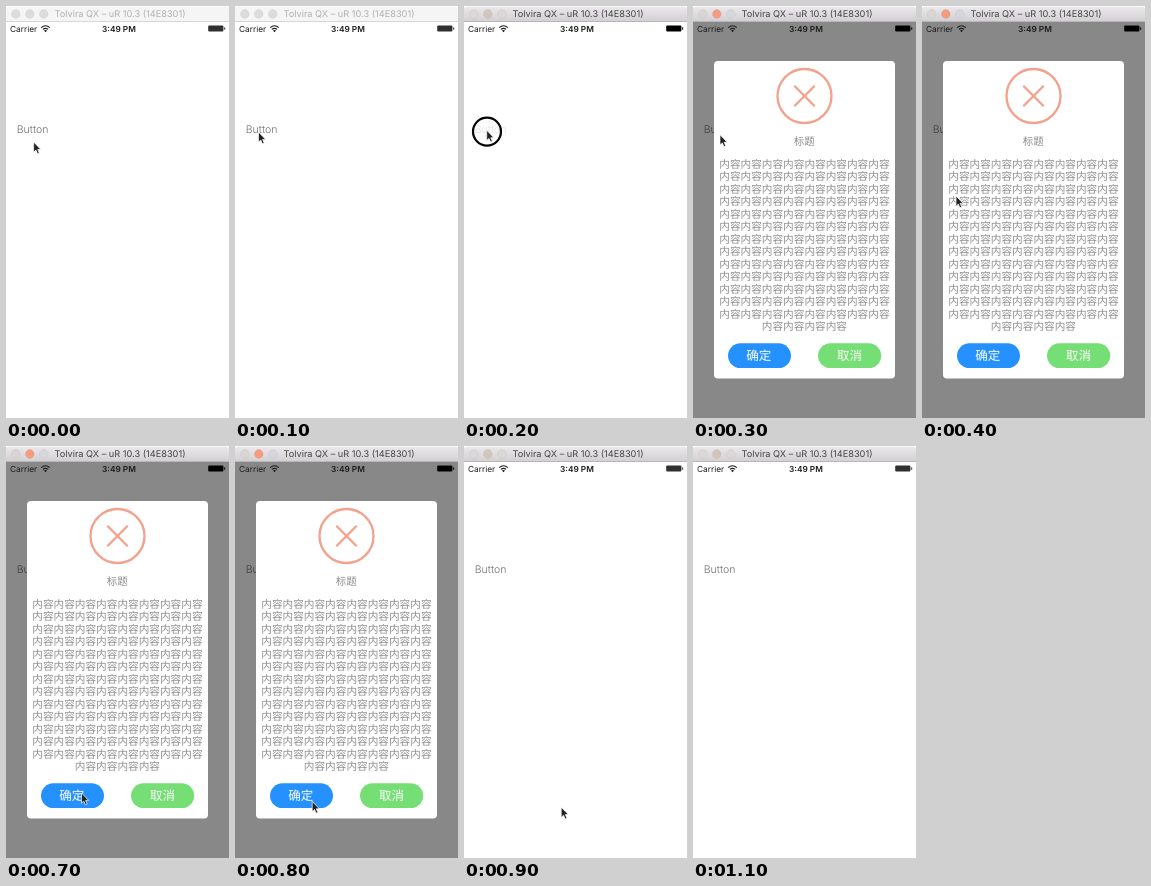
An HTML page for the animation above (1200 ms loop, 223 px wide and 412 px high).

```html
<!DOCTYPE html>
<html lang="zh">
<head>
<meta charset="utf-8">
<style>
  html, body { margin: 0; width: 100%; height: 100%; overflow: hidden; background: #fff; }
  svg { display: block; width: 223px; height: 412px; font-family: Inter, Roboto, sans-serif; text-rendering: geometricPrecision; }
  .cjk { font-family: "Noto Sans CJK SC", "Noto Sans CJK", "Noto Sans CJK JP", sans-serif; text-anchor: middle; }
  .mid { text-anchor: middle; }
</style>
</head>
<body>
<svg viewBox="0 0 223 412">
  <defs>
    <linearGradient id="bar" x2="0" y2="1">
      <stop stop-color="#ebe8eb"/><stop offset="1" stop-color="#d2d0d2"/>
    </linearGradient>
  </defs>
  <rect width="223" height="412" fill="#fff"/>

  <text id="button" x="10.8" y="126.6" font-size="10.5" font-weight="300" fill="#707070">Button</text>
  <rect id="dim" y="15" width="223" height="397" fill="#000" opacity=".465"/>

  <g id="status" fill="#1c1c1c">
    <text x="4" y="25.6" font-size="8.3">Carrier</text>
    <g fill="none" stroke="#1c1c1c" stroke-width="1.2">
      <path d="M35.2 21.6Q39.5 17.9 43.8 21.6M36.9 23.4Q39.5 21.2 42.1 23.4"/>
    </g>
    <path d="M37.9 24.5Q39.5 23.3 41.1 24.5L39.5 26.2Z"/>
    <text class="mid" x="112.9" y="25.6" font-size="8.3" font-weight="600">3:49 PM</text>
    <g id="battery">
      <rect x="202.2" y="19.6" width="15.2" height="5.8" rx="1"/>
      <rect x="218.2" y="21.3" width="1" height="2.4" rx=".5"/>
    </g>
  </g>

  <g id="titlebar">
    <path id="chrome" d="M0 15.5V3Q0 .8 3 .8H220Q223 .8 223 3V15.5Z"/>
    <path id="edge" d="M0 15.5H223" stroke-width="1"/>
    <g id="dots" stroke="#000" stroke-opacity=".08" stroke-width=".6">
      <circle cx="9.8" cy="8" r="4.4"/>
      <circle cx="23.8" cy="8" r="4.4"/>
      <circle cx="37.8" cy="8" r="4.4"/>
    </g>
    <text id="title" class="mid" x="114" y="11.4" font-size="9.2">Tolvira QX – uR 10.3 (14E8301)</text>
  </g>

  <g id="modal">
    <rect x="21" y="55" width="181" height="317.5" rx="4" fill="#fff"/>
    <g fill="none" stroke="#f2a28c" stroke-width="2.3">
      <circle cx="111.5" cy="90" r="27"/>
      <path d="M101.3 79.8L121.7 100.2M121.7 79.8L101.3 100.2"/>
    </g>
    <text class="cjk" x="111.3" y="138.6" font-size="10.5" fill="#8c8c8c">标题</text>
    <g id="lines" class="cjk" font-size="10.65" fill="#8f8f8f"></g>
    <rect x="35" y="337.3" width="63" height="24.7" rx="12.35" fill="#2491ff"/>
    <rect x="125" y="337.3" width="63.2" height="24.7" rx="12.35" fill="#75df75"/>
    <g class="cjk" font-size="12.5" fill="#fff">
      <text x="65.8" y="354.4">确定</text>
      <text x="156.4" y="354.4">取消</text>
    </g>
  </g>

  <circle id="ring" cx="23" cy="125.6" r="14" fill="none" stroke="#050505" stroke-width="2.2"/>
  <path id="cursor" d="M0 0V10.2L2.3 8.1L3.9 11.8L5.7 11L4.1 7.4H7.2Z"
        fill="#222" stroke="#fff" stroke-width=".7" stroke-linejoin="round"/>
</svg>
<script>
  const $ = id => document.getElementById(id);
  const STEP = 100;

  // cursor tip for each step; null hides it
  const tips = [
    [27.6, 136], [23.5, 126], [22.7, 124.3], [27, 128.8],
    [34, 190], [62, 300], [74.5, 341], [75.5, 347],
    [77.2, 355.4], [97.2, 361.2], null, null
  ];
  const dotColors = {
    idle: ['#dcdcdc', '#dcdcdc', '#dcdcdc'],
    active: ['#dbd8d8', '#d3c5ba', '#dad7d5'],
    alert: ['#d9d5d5', '#f69a80', '#d6d7dc']
  };

  for (let i = 0; i < 14; i++) {
    const line = document.createElementNS('http://www.w3.org/2000/svg', 'text');
    line.setAttribute('x', 111.4);
    line.setAttribute('y', 162 + i * 12.46);
    line.textContent = '内容'.repeat(i < 13 ? 8 : 4);
    $('lines').append(line);
  }

  const show = (id, on) => $(id).setAttribute('visibility', on ? 'visible' : 'hidden');
  const paint = (id, color) => $(id).setAttribute('fill', color);

  function draw(step) {
    const idle = step < 2;
    const open = step >= 3 && step <= 8;
    const pressed = step === 2;
    const tip = tips[step];

    show('dim', open);
    show('modal', open);
    show('ring', pressed);
    show('cursor', tip);
    if (tip) $('cursor').setAttribute('transform', `translate(${tip})`);

    $('button').setAttribute('opacity', pressed ? 0.2 : 1);
    paint('battery', open || pressed ? '#000' : '#303030');
    paint('chrome', idle ? '#f5f5f5' : 'url(#bar)');
    $('edge').setAttribute('stroke', idle ? '#d6d6d6' : '#b8b6b8');
    paint('title', idle ? '#b0b0b0' : '#444');

    const colors = dotColors[idle ? 'idle' : open ? 'alert' : 'active'];
    [...$('dots').children].forEach((dot, i) => dot.setAttribute('fill', colors[i]));
  }

  let last = -1;
  function tick() {
    const step = Math.floor(performance.now() / STEP) % tips.length;
    if (step !== last) draw(last = step);
    requestAnimationFrame(tick);
  }
  tick();
</script>
</body>
</html>
```
